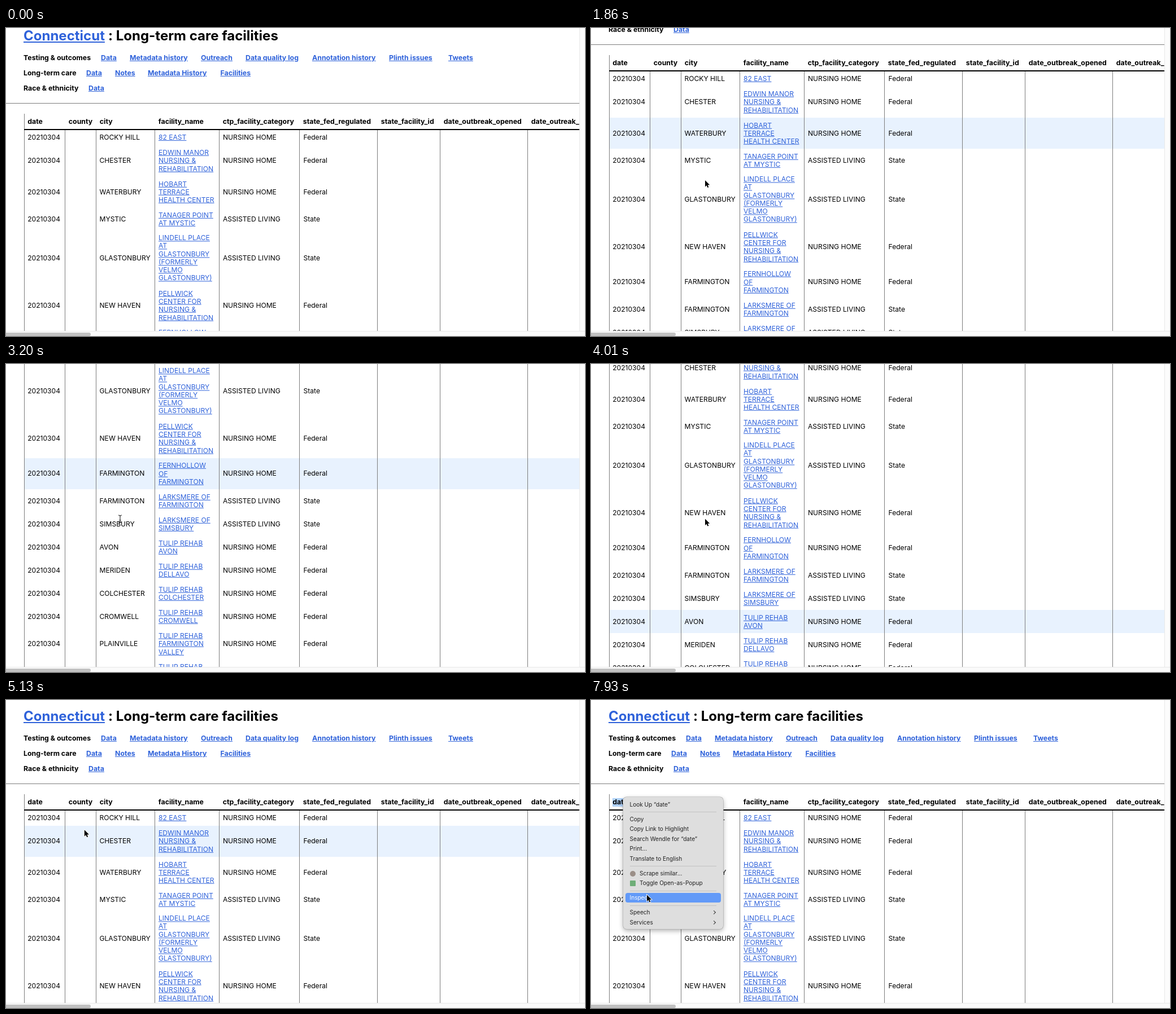
These frames come from a looping animation (1025 by 546 pixels, 8000 ms). An HTML page:

```html
<!DOCTYPE html>
<html lang="en">
<head>
<meta charset="utf-8">
<title>Long-term care facilities</title>
<style>
html, body { margin: 0; width: 100%; height: 100%; overflow: hidden; background: #fff; }
#stage { position: relative; width: 1025px; height: 546px; overflow: hidden; background: #fdfdfd;
  font: 12.1px/14.2px Inter, sans-serif; font-optical-sizing: none; color: #000; white-space: pre; }
#stage div, #stage span, #stage svg { position: absolute; }
#view { left: 0; top: 0; width: 1015px; height: 537px; overflow: hidden; background: #fff; }
#page { left: 0; top: 0; width: 1015px; height: 1200px; will-change: transform; }
.link { color: #2f62da; text-decoration: underline; }
.bold { font-weight: 700; font-size: 12.35px; transform: translateY(-50%); }
#stage .title { font-size: 24px; line-height: 30px; }
.row { left: 32px; width: 983px; }
.row.on { background: #e8f2fe; }
.row span { top: 50%; transform: translateY(-50%); }
.rule { background: #7d7d7d; }
#selection { left: 38px; top: 174px; width: 28px; height: 15px; background: #b0d2fb; }
#menu { left: 57px; top: 172px; width: 177px; height: 234px; border-radius: 6px; background: #dedede;
  box-shadow: 0 0 0 .6px #aaa, 0 3px 8px rgba(0,0,0,.32); font-size: 10.05px; color: #222; }
.item { left: 4px; width: 169px; height: 17.4px; line-height: 17.4px; border-radius: 4px; }
.item.on { background: #629af8; color: #fff; }
.sep { left: 12px; width: 153px; height: 1px; background: #c2c2c2; }
.chevron { right: 10px; top: 6px; width: 4px; height: 4px; border: solid #333; border-width: 1.3px 1.3px 0 0; transform: rotate(45deg); }
.icon { left: 8px; top: 4px; width: 10px; height: 10px; }
#hbar { left: 0; top: 537px; width: 1025px; height: 9px; box-sizing: border-box; border-top: 1px solid #e8e8e8; background: #fafafa; }
#vbar { left: 1015px; top: 0; width: 10px; height: 537px; box-sizing: border-box; border-left: 1px solid #e8e8e8; background: #fcfcfc; }
#thumb { left: -6px; top: 540px; width: 156px; height: 6px; border-radius: 3px; background: #c1c1c1; }
#arrow, #ibeam { left: 0; top: 0; overflow: visible; }
</style>
</head>
<body>
<div id="stage">
  <div id="view"><div id="page"></div></div>
  <div id="vbar"></div><div id="hbar"></div><div id="thumb"></div>
  <div id="menu"></div>
  <svg id="arrow" width="10" height="15"><path d="M0 0V11.4L2.6 9 4.4 13 6.3 12.2 4.6 8.2H8.2Z" stroke="#fff" stroke-width="1.6" paint-order="stroke"/></svg>
  <svg id="ibeam" width="8" height="15"><path d="M-3-6.5Q0-6.5 0-4.5Q0-6.5 3-6.5M0-4.5V4.5M-3 6.5Q0 6.5 0 4.5Q0 6.5 3 6.5M-1.5 2.5H1.5" fill="none" stroke="#222" stroke-width="1.1"/></svg>
</div>
<script>
const $ = id => document.getElementById(id);
const page = $('page'), menu = $('menu');

function add(parent, tag, className, style = {}, text = '') {
  const el = document.createElement(tag);
  el.className = className;
  el.textContent = text;
  for (const key in style) el.style[key] = typeof style[key] === 'number' ? style[key] + 'px' : style[key];
  parent.append(el);
  return el;
}
const bold = (left, top, text, extra = '') => add(page, 'span', 'bold ' + extra, { left, top }, text);

// Table rows: city, facility name, state-regulated flag
const rowData = [
  ['ROCKY HILL', '82 EAST'],
  ['CHESTER', 'EDWIN MANOR\nNURSING &\nREHABILITATION'],
  ['WATERBURY', 'HOBART\nTERRACE\nHEALTH CENTER'],
  ['MYSTIC', 'TANAGER POINT\nAT MYSTIC', 1],
  ['GLASTONBURY', 'LINDELL PLACE\nAT\nGLASTONBURY\n(FORMERLY\nVELMO\nGLASTONBURY)', 1],
  ['NEW HAVEN', 'PELLWICK\nCENTER FOR\nNURSING &\nREHABILITATION'],
  ['FARMINGTON', 'FERNHOLLOW\nOF\nFARMINGTON'],
  ['FARMINGTON', 'LARKSMERE OF\nFARMINGTON', 1],
  ['SIMSBURY', 'LARKSMERE OF\nSIMSBURY', 1],
  ['AVON', 'TULIP REHAB\nAVON'],
  ['MERIDEN', 'TULIP REHAB\nDELLAVO'],
  ['COLCHESTER', 'TULIP REHAB\nCOLCHESTER'],
  ['CROMWELL', 'TULIP REHAB\nCROMWELL'],
  ['PLAINVILLE', 'TULIP REHAB\nFARMINGTON\nVALLEY'],
  ['GUILFORD', 'TULIP REHAB\nGUILFORD'],
  ['EAST HAVEN', 'TULIP REHAB\nELM GROVE']
];
let nextTop = 195.7;
const rows = rowData.map(([city, name, state]) => {
  const top = nextTop, height = 12.7 + 14.2 * name.split('\n').length;
  nextTop += height;
  const el = add(page, 'div', 'row', { top, height });
  const cell = (x, text, extra = '') => add(el, 'span', extra, { left: x - 32 }, text);
  cell(38.2, '20210304');
  cell(165.5, city);
  cell(270, name, 'link');
  cell(384, state ? 'ASSISTED LIVING' : 'NURSING HOME');
  cell(526.5, state ? 'State' : 'Federal');
  return { el, top, bottom: nextTop };
});

// Heading and navigation
bold(31, 29, 'Connecticut', 'title link');
bold(181, 29, ': Long-term care facilities', 'title');
const nav = [
  [68, 'Testing & outcomes', [168, 'Data'], [219, 'Metadata history'], [345, 'Outreach'], [424, 'Data quality log'],
    [542, 'Annotation history'], [678, 'Plinth issues'], [783, 'Tweets']],
  [95, 'Long-term care', [142, 'Data'], [193, 'Notes'], [251, 'Metadata History'], [379.5, 'Facilities']],
  [122, 'Race & ethnicity', [146, 'Data']]
];
for (const [y, label, ...links] of nav) {
  bold(31, y, label);
  for (const [x, text] of links) bold(x, y, text, 'link');
}
add(page, 'div', 'rule', { left: 0, top: 148, width: 1015, height: 1 });

// Table header and column lines
const selection = add(page, 'div', '');
selection.id = 'selection';
const columns = [[32, 'date'], [104, 'county'], [159, 'city'], [263, 'facility_name'], [377, 'ctp_facility_category'],
  [519, 'state_fed_regulated'], [657, 'state_facility_id'], [768, 'date_outbreak_opened'], [923, 'date_outreak_closed']];
columns.forEach(([x, text], i) => {
  const top = i ? 195 : 167;
  add(page, 'div', 'rule', { left: i ? x : 31.5, top, width: 1, height: 1200 - top });
  bold(x + (i ? 6.8 : 6.2), 181, text);
});
add(page, 'div', '', { left: 32, top: 194, width: 983, height: 2, background: '#000' });

// Context menu
const menuData = [[185.5, 'Look Up “date”'], [211.5, 'Copy'], [229, 'Copy Link to Highlight'],
  [246.5, 'Search Wendle for “date”'], [264, 'Print...'], [281.3, 'Translate to English'],
  [307.2, 'Scrape similar...', '#9b8f88', '50%'], [324.6, 'Toggle Open-as-Popup', '#6fae78', '1px'],
  [350.5, 'Inspect'], [376.8, 'Speech'], [394.2, 'Services']];
const items = menuData.map(([y, text, color, radius], i) => {
  const el = add(menu, 'div', 'item', { top: y - 180.7 });
  add(el, 'span', '', { left: color ? 25 : 7.5 }, text);
  if (color) add(el, 'div', 'icon', { background: color, borderRadius: radius });
  if (i > 8) add(el, 'div', 'chevron');
  return { el, y };
});
for (const y of [198, 293.5, 337.5, 363.5]) add(menu, 'div', 'sep', { top: y - 172 });

// Bursts of movement: start, end, number of steps
const bursts = [[240, 760, 10], [940, 1110, 4], [1460, 1970, 10], [2210, 2730, 10], [2910, 3320, 8], [3560, 3610, 2],
  [3790, 4130, 7], [4310, 4550, 5], [4730, 5480, 14], [5540, 5541, 2], [5950, 6010, 2], [6730, 7480, 14], [7540, 7930, 8]];
const scrollKeys = [[1403, 15], [1860, 120], [1970, 126], [2152, 126], [2441, 186], [2730, 297], [2852, 297],
  [3203, 375], [3320, 407], [3733, 407], [4016, 243], [4130, 200], [4253, 200], [4550, 75], [4673, 75], [4900, 0]];
const cursorKeys = [[239, 708, -40], [240, 708, 3], [500, 420, 62], [760, 229, 106], [883, 229, 106], [1110, 202, 270],
  [2852, 202, 270], [2910, 202, 274.5], [4900, 202, 274.5], [5133, 139, 230.5], [5480, 58.5, 178], [5541, 58, 177.5],
  [5950, 58, 177], [6673, 58, 177], [7480, 97, 301], [7540, 97, 305], [7930, 99, 345.5]];
// Row under the pointer; 'live' follows it, numbers are kept while scrolling
const hoverKeys = [[0, 'live'], [1403, 2], [2852, 6], [3560, 9], [4253, 4], [4673, 3], [4900, 'live']];

const lastBefore = (keys, t) => keys.filter(key => key[0] <= t).pop();

function stepTime(t) {
  const burst = lastBefore(bursts, t);
  if (!burst) return 0;
  const [start, end, count] = burst, dt = (end - start) / (count - 1);
  return start + Math.min(count - 1, Math.floor((t - start) / dt + .15)) * dt;
}

function track(keys, t) {
  const a = lastBefore(keys, t) || keys[0];
  const b = keys[keys.indexOf(a) + 1];
  if (!b || t <= a[0]) return a.slice(1);
  const p = (t - a[0]) / (b[0] - a[0]);
  return a.slice(1).map((v, i) => v + (b[i + 1] - v) * p);
}

function render(now) {
  const t = stepTime(now % 8000);
  const scroll = Math.round(track(scrollKeys, t)[0]);
  const [x, y] = track(cursorKeys, t);
  page.style.transform = `translateY(${-scroll}px)`;

  const hover = lastBefore(hoverKeys, t)[1];
  rows.forEach(({ el, top, bottom }, i) => {
    const live = y + scroll >= top && y + scroll < bottom && t < 5950;
    el.classList.toggle('on', hover === 'live' ? live : hover === i);
  });

  const menuOpen = t >= 6009;
  selection.hidden = t < 5950;
  menu.hidden = !menuOpen;
  for (const item of items) item.el.classList.toggle('on', menuOpen && x > 61 && Math.abs(y - item.y) < 8.7);

  const overText = (t >= 2910 && t < 3560) || (t >= 5421 && t < 6009);
  const pointer = `translate(${x}px, ${y}px)`;
  $('arrow').style.transform = $('ibeam').style.transform = pointer;
  $('arrow').style.visibility = overText ? 'hidden' : 'visible';
  $('ibeam').style.visibility = overText ? 'visible' : 'hidden';
}

function loop() {
  render(performance.now());
  requestAnimationFrame(loop);
}
loop();
</script>
</body>
</html>
```
